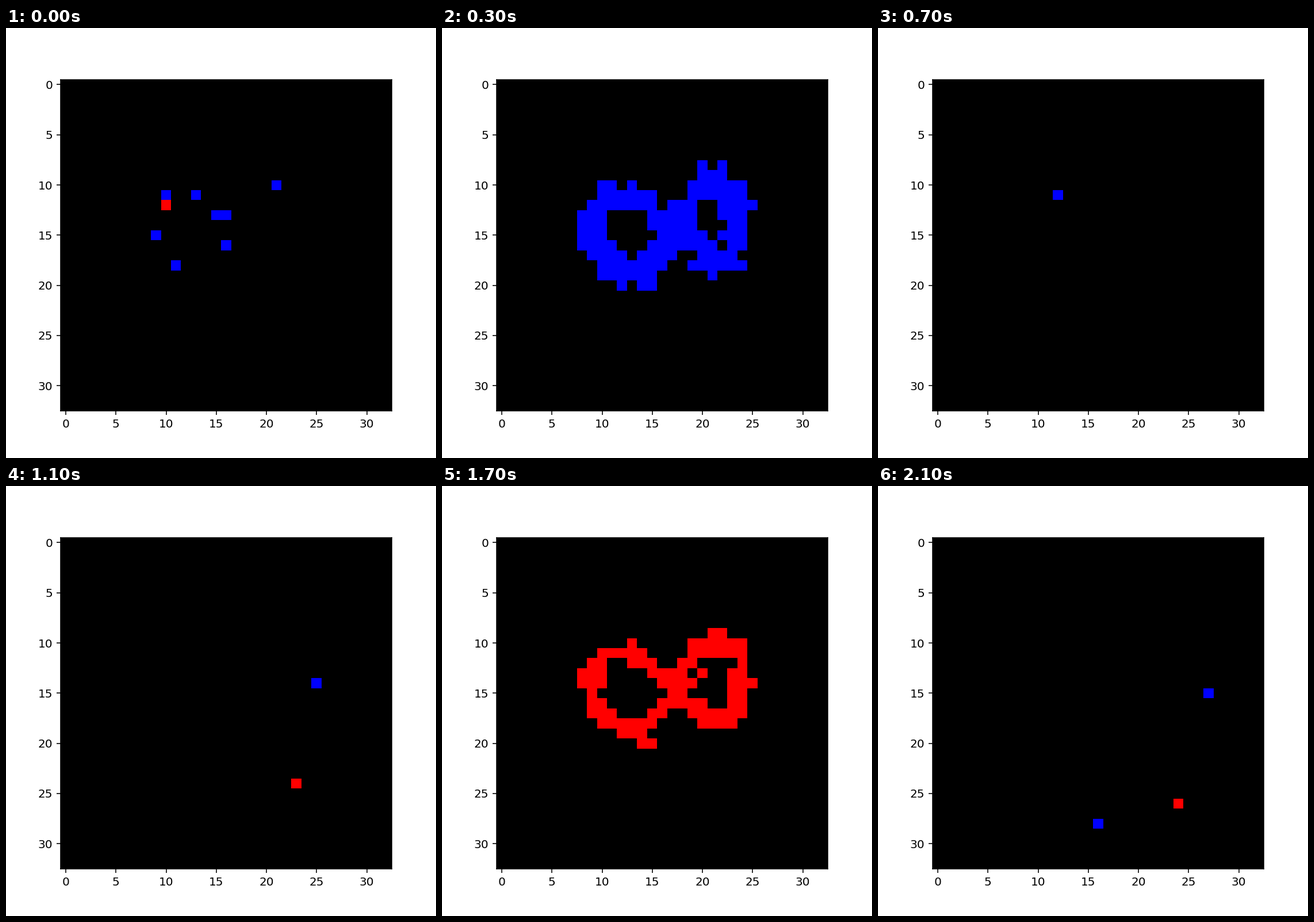
Write a matplotlib script that moves like this. It is 748x748 px and loops after 2.2 s.

```python
import numpy as np
import matplotlib.pyplot as plt
from matplotlib.animation import FuncAnimation

SIZE, DPI, GRID = 748, 144, 33
FRAMES, STEP_MS = 22, 100
RED, BLUE, MAGENTA = (255, 0, 0), (0, 0, 255), (255, 0, 255)

# Pen path of a lying figure eight, in cells
PATH = np.array([
    (9.2, 13.5), (10.5, 11), (13, 11), (15.5, 13), (18, 13.5), (19.5, 11),
    (21, 9.5), (23.4, 11), (23.8, 14), (23, 17), (21, 17.5), (18, 15),
    (16, 16), (14.5, 18.5), (11.5, 18.3), (9.3, 16), (9.2, 13.5),
])

# Lone events away from the figure: step -> (x, y, colour)
STRAYS = {
    0: [(10, 12, RED)],
    11: [(25, 14, BLUE), (23, 24, RED)],
    14: [(25, 14, MAGENTA), (23, 24, RED), (25, 22, RED), (27, 28, BLUE)],
    21: [(27, 15, BLUE), (24, 26, RED), (16, 28, BLUE)],
}


def path_distance():
    """Distance from every cell to the nearest point of the path."""
    y, x = np.mgrid[:GRID, :GRID]
    cells = np.stack([x, y], axis=-1)
    best = np.full((GRID, GRID), np.inf)
    for a, b in zip(PATH, PATH[1:]):
        ab = b - a
        t = np.clip((cells - a) @ ab / (ab @ ab), 0, 1)
        nearest = a + t[..., None] * ab
        best = np.minimum(best, np.linalg.norm(cells - nearest, axis=-1))
    return best


def pulse(step, centre, width):
    return np.exp(-((step - centre) / width) ** 4)


def picture(step):
    """Ragged strokes that swell and fade with each burst of events."""
    noise = np.random.default_rng(step).normal(0, 0.45, (GRID, GRID))
    img = np.zeros((GRID, GRID, 3), np.uint8)
    blue = 2.7 * pulse(step, 3.2, 3.5)
    red = 3.0 * pulse(step, 15, 2.9)
    reach = max(blue, red) - 1.4
    img[DISTANCE < reach + noise] = BLUE if blue > red else RED
    for x, y, colour in STRAYS.get(step, []):
        img[y, x] = colour
    return img


DISTANCE = path_distance()

fig, ax = plt.subplots(figsize=(SIZE / DPI, SIZE / DPI), dpi=DPI)
image = ax.imshow(picture(0), interpolation="nearest")
ax.set_xticks(range(0, GRID, 5))
ax.set_yticks(range(0, GRID, 5))


def update(step):
    image.set_data(picture(step))
    return [image]


anim = FuncAnimation(fig, update, frames=FRAMES, interval=STEP_MS,
                     repeat=True, repeat_delay=0)
plt.show()
```
